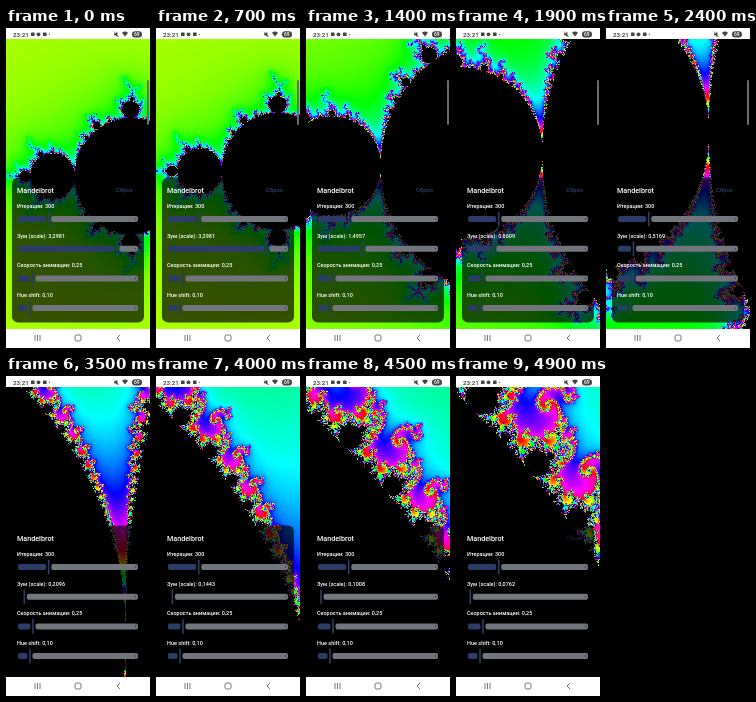
An HTML page with a canvas for the animation above (5000 ms loop, 144 px wide and 320 px high).

```html
<!DOCTYPE html>
<html lang="ru">
<head>
<meta charset="utf-8">
<title>Mandelbrot</title>
<style>
html, body { margin: 0; width: 100%; height: 100%; overflow: hidden; background: #fff; }
canvas, svg { position: absolute; left: 0; top: 0; width: 144px; height: 320px; }
canvas { top: 11px; height: 290px; }
text { font: 500 5.5px Roboto, sans-serif; fill: #fff; }
</style>
</head>
<body>
<canvas id="view" width="144" height="290"></canvas>
<svg id="ui" viewBox="0 0 144 320">
  <text x="7" y="8.6" style="font-size:6.2px;fill:#333">23:21</text>
  <g fill="#444">
    <rect x="25" y="4.5" width="3.6" height="3.6" rx=".6"/>
    <circle cx="32.5" cy="6.3" r="1.9"/>
    <rect x="37" y="4.5" width="3.6" height="3.6" rx=".6"/>
    <circle cx="43.4" cy="6.3" r=".6"/>
    <path d="M108 5.4h1.4l2-1.7v5.2l-2-1.7H108z"/>
    <path d="M116 4.8q3-2.4 6 0l-3 3.8z"/>
    <rect x="126" y="3.2" width="10" height="6.2" rx="3"/>
  </g>
  <path d="M108 3.6l4.6 5.4" stroke="#444" stroke-width=".7"/>
  <text x="128" y="8.1" style="font-size:5px">69</text>
  <rect id="edge" x="141" y="52" width="2" height="45" rx="1" fill="#647070"/>
  <rect x="6" y="149.5" width="132" height="145" rx="6" fill="#000" fill-opacity=".68"/>
  <text x="11" y="164.5" style="font-size:7.2px">Mandelbrot</text>
  <text id="reset" x="110" y="164.3" style="font-size:6px;fill:#33426f">Сброс</text>
  <g fill="none" stroke="#555" stroke-width=".8">
    <path d="M29 307v6M31.5 307v6M34 307v6M114 307l-3 3 3 3"/>
    <rect x="69" y="307" width="6" height="6" rx="1.8"/>
  </g>
</svg>
<script>
const W = 144, H = 290, TOP = 11, LOOP = 5000, STEP = 100, LIMIT = 300;
const PX_PER_SCALE = 294, MID_X = 72, MID_Y = 156;

// Camera: key times in seconds, view size and centre
const times = [0, 0.7, 1.4, 2.4, 3.5, 4.5, 4.9];
const zoom = [3.2981, 3.2981, 1.4957, 0.5169, 0.2096, 0.1008, 0.0762].map(Math.log);
const camX = [-0.716, -0.683, -0.765, -0.8045, -0.784, -0.811, -0.8085];
const camY = [0.09, 0.146, 0.092, 0.0914, -0.075, -0.147, -0.145];

// Monotone cubic curve through the keys
function curve(v, t) {
  const last = times.length - 1;
  let i = 0;
  while (i < last - 1 && t > times[i + 1]) i++;
  const slope = k => (v[k + 1] - v[k]) / (times[k + 1] - times[k]);
  const tangent = k => {
    if (k === 0) return slope(0);
    if (k === last) return slope(last - 1);
    const a = slope(k - 1), b = slope(k);
    return a * b <= 0 ? 0 : 2 * a * b / (a + b);
  };
  const d = times[i + 1] - times[i], u = (t - times[i]) / d;
  const s = u * u * (3 - 2 * u);
  return v[i] + (v[i + 1] - v[i]) * s
    + d * u * (1 - u) * ((1 - u) * tangent(i) - u * tangent(i + 1));
}

// Smooth escape count, or -1 inside the set
function escape(cx, cy) {
  const y2 = cy * cy, q = (cx - 0.25) ** 2 + y2;
  if (q * (q + cx - 0.25) <= y2 / 4 || (cx + 1) ** 2 + y2 <= 0.0625) return -1;
  let x = 0, y = 0, xx = 0, yy = 0, n = 0;
  while (xx + yy < 1e4 && n < LIMIT) {
    y = 2 * x * y + cy;
    x = xx - yy + cx;
    xx = x * x;
    yy = y * y;
    n++;
  }
  return n === LIMIT ? -1 : n + 1 - Math.log2(Math.log2(xx + yy) / 2);
}

const ctx = document.getElementById('view').getContext('2d');
const image = ctx.createImageData(W, H);

const channel = (hue, shift) =>
  255 * Math.min(1, Math.max(0, Math.abs((hue + shift) % 1 * 6 - 3) - 1));

function drawFractal(scale, cx, cy) {
  const unit = scale / PX_PER_SCALE, data = image.data;
  for (let y = 0, p = 0; y < H; y++) {
    for (let x = 0; x < W; x++, p += 4) {
      const n = escape(cx + (x + 0.5 - MID_X) * unit, cy + (y + 0.5 + TOP - MID_Y) * unit);
      const hue = 0.19 + 0.016 * Math.max(0, n);
      data[p] = n < 0 ? 0 : channel(hue, 0);
      data[p + 1] = n < 0 ? 0 : channel(hue, 2 / 3);
      data[p + 2] = n < 0 ? 0 : channel(hue, 1 / 3);
      data[p + 3] = 255;
    }
  }
  ctx.putImageData(image, 0, 0);
}

const ui = document.getElementById('ui');
const reset = document.getElementById('reset'), edge = document.getElementById('edge');

function add(tag, attrs) {
  const node = document.createElementNS('http://www.w3.org/2000/svg', tag);
  for (const k in attrs) node.setAttribute(k, attrs[k]);
  return ui.appendChild(node);
}

function slider(y, label) {
  const text = add('text', { x: 11, y: y - 11 });
  const bar = { y: y - 3, height: 6, rx: 2 };
  const active = add('rect', { ...bar, x: 12, fill: '#2b3c68' });
  const rest = add('rect', { ...bar, fill: '#73757d' });
  const handle = add('rect', { y: y - 7.5, width: 1.6, height: 15, rx: 0.8, fill: '#2b3c68' });
  add('circle', { cx: 129.5, cy: y, r: 0.8, fill: '#2b3c68' });
  return (part, value) => {
    const x = 12 + 120 * part, filled = x - 14.5;
    text.textContent = label + ': ' + value;
    active.setAttribute('width', filled < 4 ? 0 : filled);
    rest.setAttribute('x', x + 2.5);
    rest.setAttribute('width', 129.5 - x);
    handle.setAttribute('x', x - 0.8);
  };
}

slider(191, 'Итерации')(0.256, '300');
const setZoom = slider(220.7, 'Зум (scale)');
slider(250.4, 'Скорость анимации')(0.125, '0,25');
slider(280, 'Hue shift')(0.1, '0,10');

let shown = -1;
const start = performance.now();

function frame() {
  const ms = Math.floor((performance.now() - start) % LOOP / STEP) * STEP;
  if (ms !== shown) {
    shown = ms;
    const t = ms / 1000, scale = Math.exp(curve(zoom, t));
    drawFractal(scale, curve(camX, t), curve(camY, t));
    setZoom(scale / 4, scale.toFixed(4).replace('.', ','));
    edge.setAttribute('opacity', t < 3 ? 1 : 0);
    reset.setAttribute('opacity', t < 3 ? 1 : t < 4.7 ? 0 : 0.5);
  }
  requestAnimationFrame(frame);
}
frame();
</script>
</body>
</html>
```
